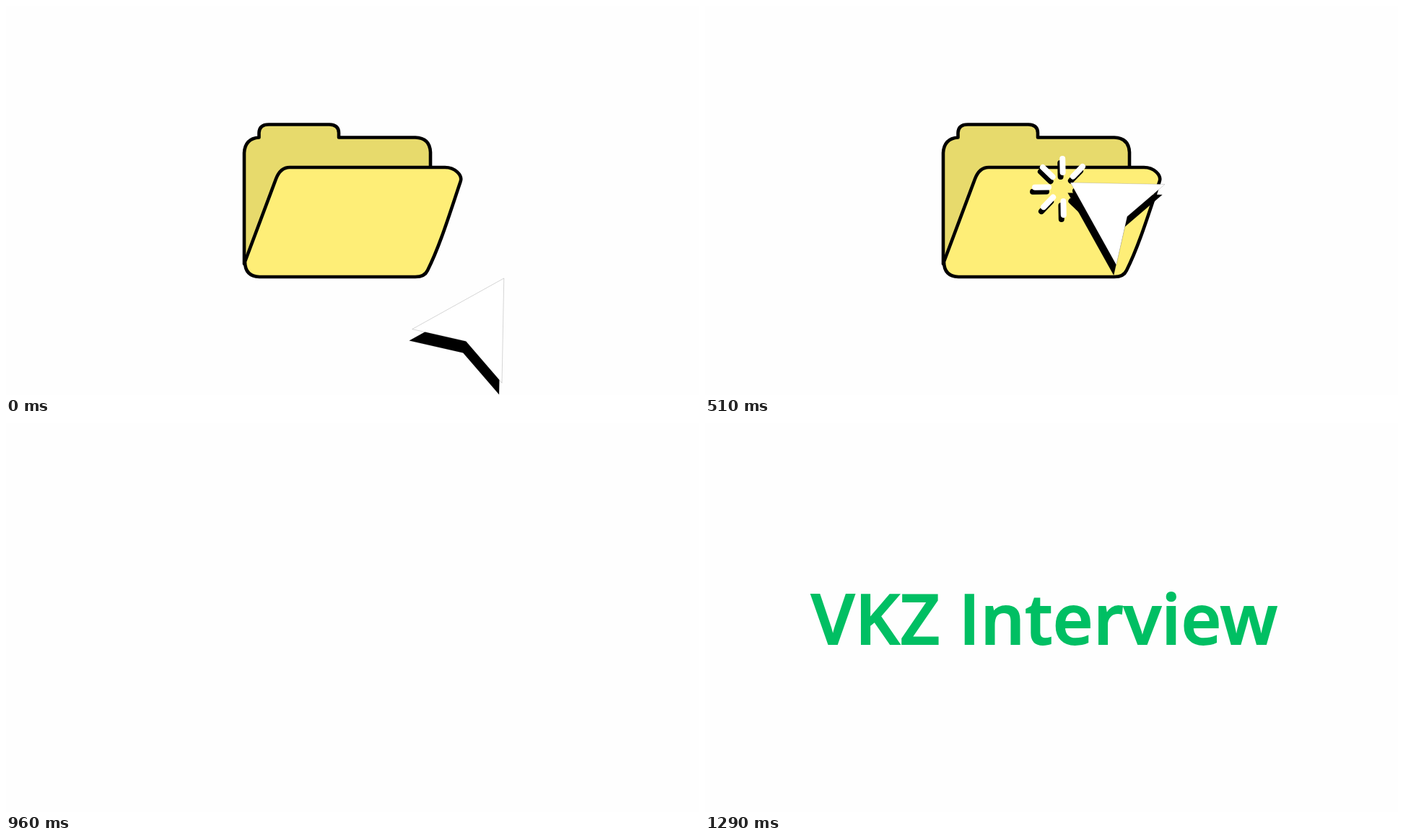
Animation of 960x540 px, one loop 3.69 s. Source, as an HTML page:

```html
<!DOCTYPE html>
<html lang="en">
<head>
<meta charset="utf-8">
<title>Folder click</title>
<style>
  html, body { margin: 0; width: 100%; height: 100%; overflow: hidden; background: #fefefe; }
  svg { display: block; width: 100vw; height: 100vh; }
  text {
    font: 600 97px "Open Sans", "Noto Sans", sans-serif; letter-spacing: .3px;
    fill: #00bf63; stroke: #00bf63; stroke-width: 1.8px;
  }
</style>
</head>
<body>
<svg viewBox="0 0 960 540">
  <defs>
    <g id="arrow">
      <polygon id="head" points="84,0 -42,72.5 -18,0 -42,-72.5" fill="currentColor" stroke="#000" stroke-opacity=".3" stroke-width=".5"/>
      <path id="tail" d="M642 460C668 405 672 350 601 292L571 284" fill="none" stroke="currentColor" stroke-width="29"/>
    </g>
    <path id="rays" fill="none" stroke="currentColor" stroke-width="8" stroke-linecap="round"/>
    <clipPath id="reveal"><rect id="shown" x="0" y="200" width="0" height="140"/></clipPath>
  </defs>

  <g id="scene">
    <g stroke="#000" stroke-width="4.600" stroke-linejoin="round">
      <path fill="#e7da6c" d="M330 358V204Q331 184 350.500 182.500V176Q351 164.500 364 164.500H448Q461 165 461 176V182.500H567Q587 183 588 203V224Z"/>
      <path fill="#feee77" d="M331 355L374 240Q380 224 393 224H608C622 224 633 235 629.500 244C614 290 601 333 584 367Q580 376 567 376H351Q331 375 331 355Z"/>
    </g>
    <g id="burst">
      <use href="#rays" x="-3" y="6" color="#000"/>
      <use href="#rays" color="#fff"/>
    </g>
    <g id="press">
      <use href="#arrow" x="-4" y="16" color="#000"/>
      <use href="#arrow" color="#fff"/>
    </g>
  </g>

  <g id="title">
    <text x="147" y="307" clip-path="url(#reveal)">VKZ Interview</text>
    <rect id="block" y="213" height="114" fill="#00bf63"/>
  </g>
</svg>
<script>
const LOOP = 3690, TICK = 30;
const SCENE_END = 960, TITLE_START = 1110;
const BOX = { left: 145, width: 670 };

const $ = id => document.getElementById(id);
const set = (id, attrs) => {
  for (const key in attrs) $(id).setAttribute(key, attrs[key]);
};
const show = (id, on) => set(id, { visibility: on ? 'visible' : 'hidden' });
const part = (t, from, to) => Math.max(0, Math.min(1, (t - from) / (to - from)));
const easeOut = u => 1 - (1 - u) ** 2;

// The folder scene holds each pose for two or three ticks; the title moves every tick.
function snap(now) {
  const n = Math.floor(now / TICK);
  if (now >= SCENE_END) return n * TICK;
  const pose = k => k && Math.round(2.46 * k + 0.25);
  let k = 0;
  while (pose(k + 1) <= n) k++;
  return pose(k) * TICK;
}

const flight = $('tail');
const total = flight.getTotalLength();

function drawArrow(t) {
  const u = part(t, 60, 450);
  const front = 11 + (total - 11) * easeOut(u);
  const back = total * part(t, 300, 450);
  const angle = 59 + 90 * u ** 1.17;
  const size = 1 - 0.105 * Math.sin(Math.PI * part(t, 450, 600));
  const p = flight.getPointAtLength(front);
  set('head', { transform: `translate(${p.x} ${p.y}) rotate(${-angle})` });
  set('press', { transform: `translate(571 284) scale(${size}) translate(-571 -284)` });
  set('tail', {
    'stroke-dasharray': `0 ${back} ${Math.max(0, front - back)} ${total * 2}`,
    visibility: front - back > 1 ? 'inherit' : 'hidden'
  });
}

function drawRays(t) {
  const outer = 88 - 45 * Math.exp(-(t - 510) / 88);
  const length = 27 * (1 - part(t, 510, 900) ** 4);
  let d = '';
  for (let i = 0; i < 8; i++) {
    const a = i * Math.PI / 4 - 0.02;
    const at = r => `${496 + r * Math.cos(a)} ${251 + r * Math.sin(a)}`;
    d += `M${at(outer - length + 4)}L${at(outer - 4)}`;
  }
  set('rays', { d });
  show('burst', t >= 510 && t < SCENE_END && length > 8);
}

function drawTitle(t) {
  const grow = Math.sin(part(t, 1080, 1170) * Math.PI / 2);
  const leave = (1 - Math.cos(part(t, 1170, 1290) * Math.PI)) / 2;
  const x = BOX.left + BOX.width * leave;
  set('block', { x, width: BOX.width * Math.max(0, grow - leave) });
  set('shown', { width: leave > 0 ? x : 0 });
}

function draw(time) {
  const t = snap(time % LOOP);
  show('scene', t < SCENE_END);
  show('title', t >= TITLE_START);
  drawArrow(t);
  drawRays(t);
  drawTitle(t);
}

const start = performance.now();
function tick() {
  draw(performance.now() - start);
  requestAnimationFrame(tick);
}
tick();
</script>
</body>
</html>
```
